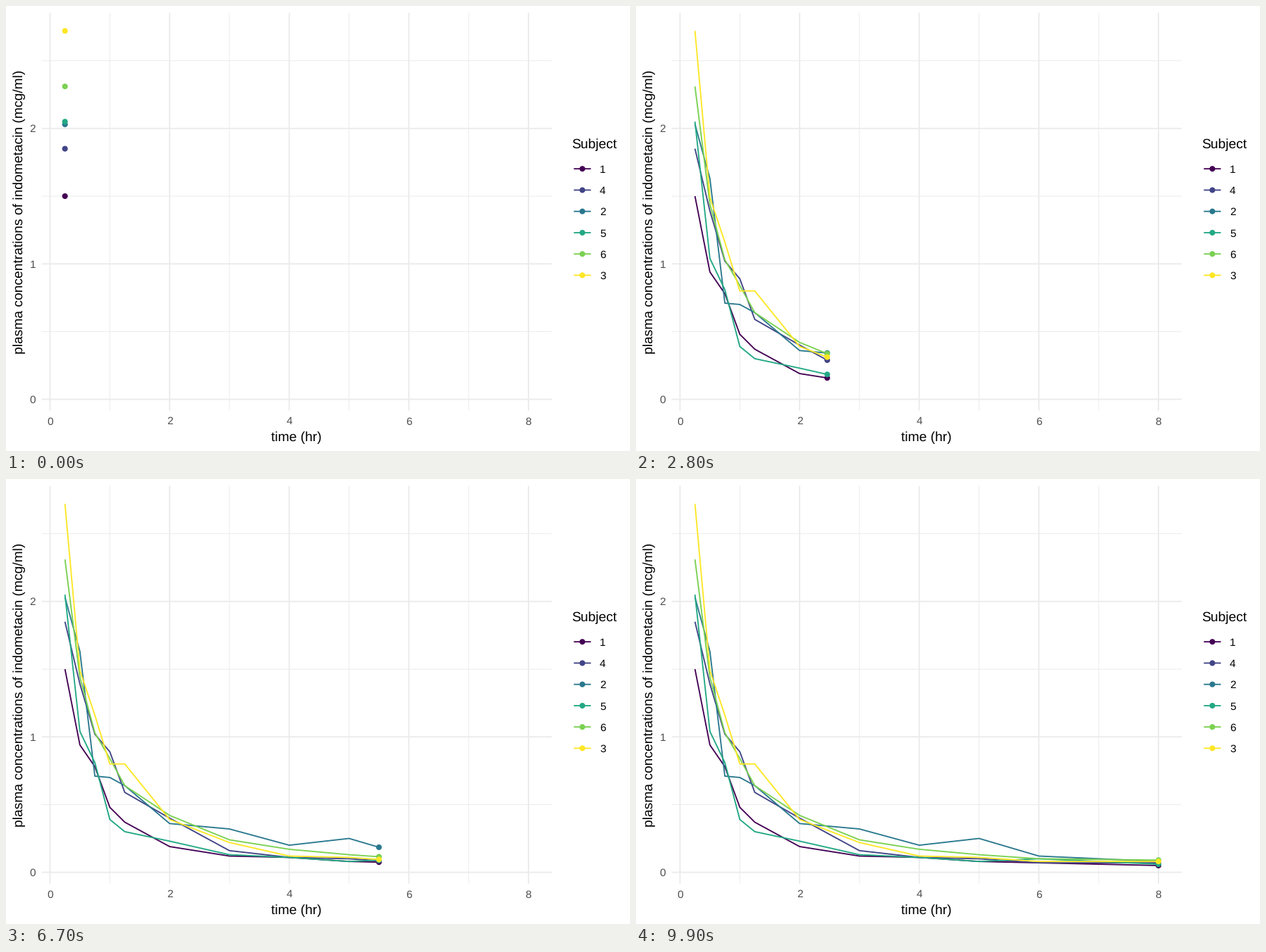
These frames come from a looping animation (885x632 px, 10000 ms). A matplotlib script:

```python
import numpy as np
import matplotlib.pyplot as plt
from matplotlib.animation import FuncAnimation

W, H, DPI = 885, 632, 100
FRAMES = 100
PT = 72 / DPI  # points per pixel

plt.rcParams["font.family"] = "Liberation Sans"
plt.rcParams["text.hinting"] = "none"

# Concentration per subject, in drawing order
TIMES = np.array([0.25, 0.5, 0.75, 1, 1.25, 2, 3, 4, 5, 6, 8])
SUBJECTS = {
    "1": [1.50, 0.94, 0.78, 0.48, 0.37, 0.19, 0.12, 0.11, 0.08, 0.07, 0.05],
    "4": [1.85, 1.39, 1.02, 0.89, 0.59, 0.40, 0.16, 0.11, 0.10, 0.07, 0.07],
    "2": [2.03, 1.63, 0.71, 0.70, 0.64, 0.36, 0.32, 0.20, 0.25, 0.12, 0.08],
    "5": [2.05, 1.04, 0.81, 0.39, 0.30, 0.23, 0.13, 0.11, 0.08, 0.10, 0.06],
    "6": [2.31, 1.44, 1.03, 0.84, 0.64, 0.42, 0.24, 0.17, 0.13, 0.10, 0.09],
    "3": [2.72, 1.49, 1.16, 0.80, 0.80, 0.39, 0.22, 0.12, 0.11, 0.08, 0.08],
}
COLORS = ["#440154", "#414487", "#2A788E", "#22A884", "#7AD151", "#FDE725"]

# Each sample is reached on a whole frame; motion between samples is linear
KEYS = np.round((TIMES - TIMES[0]) / np.ptp(TIMES) * (FRAMES - 1))

LINE, THIN, DOT = 1.867, 0.933, 8.08
TITLE, LABEL = 19.25, 15.4
GRID, GREY = "#EBEBEB", "#4D4D4D"


def px(t):
    return 62.42 + 84.82 * np.asarray(t)


def py(v):
    return 558.58 - 192.36 * np.asarray(v)


LEFT, RIGHT = px(-0.1375), px(8.3875)
TOP, BOTTOM = py(2.8535), py(-0.0835)

fig = plt.figure(figsize=(W / DPI, H / DPI), dpi=DPI, facecolor="white")
ax = fig.add_axes([0, 0, 1, 1])
ax.set_xlim(0, W)
ax.set_ylim(H, 0)
ax.axis("off")


def stroke(xs, ys, color, width, z):
    return ax.plot(xs, ys, color=color, lw=width * PT, zorder=z, snap=False,
                   solid_capstyle="butt", solid_joinstyle="round")[0]


def dots(xs, ys):
    return ax.scatter(xs, ys, s=(DOT * PT) ** 2, c=COLORS, linewidths=0,
                      zorder=4, snap=False)


def write(x, y, s, size, color="black", ha="center", **kw):
    ax.text(x, y, s, fontsize=size * PT, color=color, ha=ha,
            va="baseline", **kw)


def grid(xs, ys, width, z):
    for x in px(xs):
        stroke([x, x], [TOP, BOTTOM], GRID, width, z)
    for y in py(ys):
        stroke([LEFT, RIGHT], [y, y], GRID, width, z)


grid([1, 3, 5, 7], [0.5, 1.5, 2.5], THIN, 1)
grid([0, 2, 4, 6, 8], [0, 1, 2], LINE, 2)

for t in range(0, 9, 2):
    write(px(t), 594.4, str(t), LABEL, GREY)
for v in range(3):
    write(42.1, py(v) + 5.5, str(v), LABEL, GREY, ha="right")
write((LEFT + RIGHT) / 2, 618, "time (hr)", TITLE)
ax.text(24, (TOP + BOTTOM) / 2, "plasma concentrations of indometacin (mcg/ml)",
        fontsize=TITLE * PT, rotation=90, ha="right", va="center",
        rotation_mode="default").set(
            rotation_mode="anchor", ha="center", va="baseline")

# Legend
KEY_X, KEY_Y, KEY = 802.3, 231.2, 30.24
rows = KEY_Y + KEY * np.arange(len(SUBJECTS))
write(KEY_X, 202, "Subject", TITLE, ha="left")
for name, color, y in zip(SUBJECTS, COLORS, rows):
    stroke([KEY_X + 0.1 * KEY, KEY_X + 0.9 * KEY], [y, y], color, LINE, 3)
    write(KEY_X + KEY + 9.6, y + 5.5, name, LABEL, ha="left")
dots(np.full(len(rows), KEY_X + KEY / 2), rows)

# Moving parts
values = np.array(list(SUBJECTS.values()))
paths = [stroke([], [], c, LINE, 3) for c in COLORS]
heads = dots(px(np.full(len(values), TIMES[0])), py(values[:, 0]))


def update(k):
    past = KEYS < k
    t = np.interp(k, KEYS, TIMES)
    now = [np.interp(k, KEYS, row) for row in values]
    xs = px(np.append(TIMES[past], t))
    for path, row, v in zip(paths, values, now):
        path.set_data(xs, py(np.append(row[past], v)))
    heads.set_offsets(np.column_stack([np.full(len(now), px(t)), py(now)]))
    return [*paths, heads]


anim = FuncAnimation(fig, update, frames=FRAMES, interval=100,
                     repeat=True, repeat_delay=0, blit=False)
plt.show()
```
